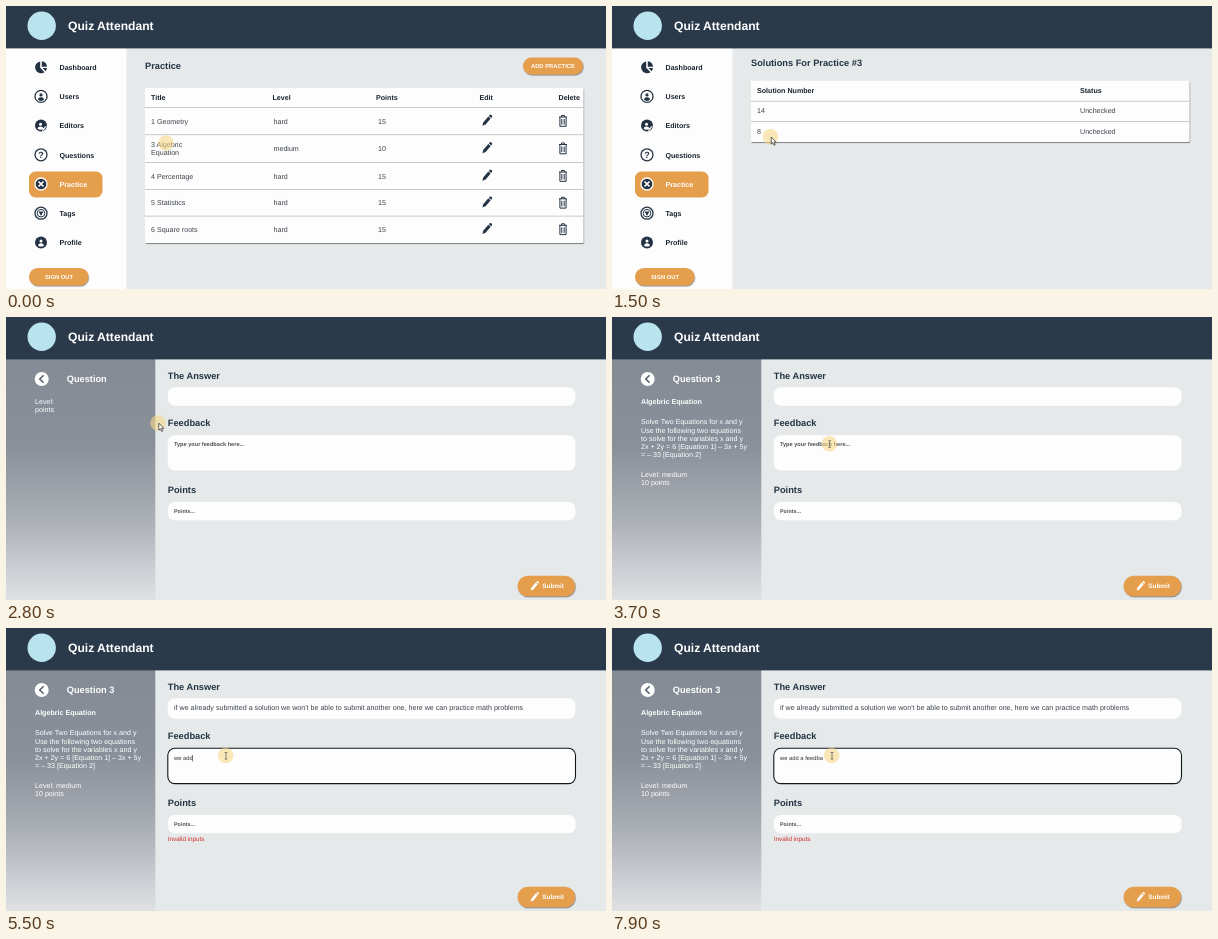
Write an HTML page that moves like this. It is 600 px wide and 283 px high and loops after 8 s.

```html
<!DOCTYPE html>
<html lang="en">
<head>
<meta charset="utf-8">
<title>Practice review</title>
<style>
  html, body { margin: 0; height: 100%; overflow: hidden; background: #e5e9e9; }
  svg { display: block; width: 600px; height: 283px; }
  text { font-family: "Liberation Sans", Arial, sans-serif; white-space: pre; text-rendering: geometricPrecision; }
</style>
</head>
<body>
<svg id="stage" viewBox="0 0 600 283">
  <defs>
    <linearGradient id="panel" x1="0" y1="0" x2="0" y2="1">
      <stop offset="0" stop-color="#848b95"/>
      <stop offset=".36" stop-color="#8a9099"/>
      <stop offset=".65" stop-color="#a9adb4"/>
      <stop offset="1" stop-color="#dfe1e4"/>
    </linearGradient>
    <filter id="shadow" x="-10%" y="-20%" width="120%" height="150%">
      <feDropShadow dx=".6" dy="1.1" stdDeviation=".7" flood-color="#4a4a4a" flood-opacity=".6"/>
    </filter>
    <g id="person">
      <circle cy="-1.8" r="2"/>
      <path d="M-4 4Q-3.4 1.2 0 1.2T4 4Q2.3 5.6 0 5.6T-4 4Z"/>
    </g>
    <g id="pencil">
      <path d="M-4.3 5.2-3.5 2 1.6-4 4 -2 -1.1 4ZM2.2-4.6 3.2-5.7Q4-6.2 5-5.3T5.2-3.4L4.5-2.6Z"/>
    </g>
    <g id="bin" fill="none" stroke="#243343" stroke-width="1">
      <path d="M-4-4H4M-1.5-4V-5.5H1.5V-4M-3.1-4V5.3H3.1V-4M-1.2-2V3.6M1.2-2V3.6"/>
    </g>
  </defs>
  <g id="page"></g>
  <g id="pointer"></g>
</svg>
<script>
const INK = '#243343', NAVY = '#2b3a4b', ORANGE = '#e59e4c', LOOP = 8000;
const page = document.getElementById('page');
const pointer = document.getElementById('pointer');

const text = (x, y, str, { size = 7.12, fill = '#3c434a', bold = false } = {}) =>
  `<text x="${x}" y="${y}" font-size="${size}" fill="${fill}" font-weight="${bold ? 700 : 400}">${str}</text>`;
const title = (x, y, str, fill = INK) => text(x, y, str, { size: 9.25, fill, bold: true });
const label = (x, y, str, fill = '#18222d') => text(x, y, str, { fill, bold: true });
const rect = (x, y, w, h, fill, r = 0, extra = '') =>
  `<rect x="${x}" y="${y}" width="${w}" height="${h}" rx="${r}" fill="${fill}" ${extra}/>`;
const use = (id, x, y, fill = INK, scale = 1) =>
  `<use href="#${id}" transform="translate(${x} ${y}) scale(${scale})" fill="${fill}"/>`;
const disc = (fill, stroke = 'none') => `<circle r="6" fill="${fill}" stroke="${stroke}" stroke-width="1.3"/>`;
const button = (x, y, w, h) => rect(x, y, w, h, ORANGE, h / 2, 'filter="url(#shadow)"');

const header = rect(0, 0, 600, 42.4, NAVY)
  + '<circle cx="35.7" cy="19.8" r="14.2" fill="#b9e3ee"/>'
  + text(62, 24.4, 'Quiz Attendant', { size: 12.1, fill: '#fff', bold: true });

const ring = disc('none', INK), solid = disc(INK);
const menu = [
  ['Dashboard', `<path fill="${INK}" d="M-.8-5.8V.6L3.6 5A6 6 0 1 1-.8-5.8ZM.8-6A6 6 0 0 1 6-.5H.8ZM1.5.9H6A6 6 0 0 1 4.6 4.1Z"/>`],
  ['Users', ring + use('person', 0, 0, INK, .8)],
  ['Editors', solid + use('person', -.5, 0, '#fff', .75) + use('pencil', 3, 3, '#fff', .45)],
  ['Questions', ring + text(-2.7, 3.2, '?', { size: 9, fill: INK, bold: true })],
  ['Practice', disc(INK, '#fff') + '<path d="M-2.5-2.5 2.5 2.5M2.5-2.5-2.5 2.5" stroke="#fff" stroke-width="1.7"/>'],
  ['Tags', disc('#fff', INK) + `<circle r="3.8" fill="none" stroke="${INK}"/><path d="M-2.3-1.6H2.3L0 2.8Z" fill="${INK}"/>`],
  ['Profile', solid + use('person', 0, 0, '#fff', .75)]
];

const sidebar = rect(0, 42, 120.5, 241, '#fdfdfe')
  + rect(23, 165.5, 73.5, 26, ORANGE, 6.5)
  + menu.map(([name, icon], i) => {
      const y = 61.2 + i * 29.2;
      return `<g transform="translate(35 ${y})">${icon}</g>`
        + label(53.5, y + 2.7, name, name === 'Practice' ? '#fff' : '#18222d');
    }).join('')
  + button(23, 262, 59.5, 17.5)
  + text(39, 272.8, 'SIGN OUT', { size: 5.8, fill: '#fff', bold: true });

const table = (top, lines, bottom) =>
  rect(139, top, 438.3, bottom - top, '#fdfdfe', 1, 'filter="url(#shadow)"')
  + lines.map(y => rect(139, y, 438.3, .8, '#b9bdc1')).join('');

function practicePage() {
  const rows = [
    [115, ['1 Geometry'], 'hard', 15],
    [142.5, ['3 Algebric', 'Equation'], 'medium', 10],
    [170, ['4 Percentage'], 'hard', 15],
    [196.8, ['5 Statistics'], 'hard', 15],
    [223.3, ['6 Square roots'], 'hard', 15]
  ];
  const heads = [[145, 'Title'], [266.5, 'Level'], [370, 'Points'], [473.5, 'Edit'], [552.5, 'Delete']];
  return sidebar + title(139, 63.2, 'Practice')
    + button(517, 51.5, 60, 17)
    + text(525, 62.3, 'ADD PRACTICE', { size: 5.8, fill: '#fff', bold: true })
    + table(82, [101, 128.3, 156.2, 183, 209.7], 237)
    + heads.map(([x, str]) => label(x, 93.7, str)).join('')
    + rows.map(([y, names, level, points]) =>
        names.map((str, i) => text(145, y + 2.5 + (i - (names.length - 1) / 2) * 8, str)).join('')
        + text(267.5, y + 2.5, level) + text(372, y + 2.5, points)
        + use('pencil', 480.7, y - .5) + use('bin', 557, y)).join('');
}

function solutionsPage(loaded, hovered) {
  return sidebar + title(139, 59.7, 'Solutions For Practice #3')
    + table(74.8, loaded ? [94.8, 115.2] : [], loaded ? 136 : 95)
    + label(145, 86.6, 'Solution Number') + label(468, 86.6, 'Status')
    + (loaded ? ['14', '8'].map((id, i) =>
        text(145, 107.4 + i * 20.6, id, { fill: hovered && !i ? '#c9862f' : '#3c434a' })
        + text(468, 107.4 + i * 20.6, 'Unchecked')).join('') : '');
}

const FEEDBACK = 'we add a feedba';
// [time, typed characters, caret visible]
const typing = [
  [3900, 0, 0], [4300, 0, 1], [4500, 1, 1], [4700, 2, 1], [4900, 3, 1], [5100, 4, 1], [5300, 5, 1],
  [5500, 6, 1], [5600, 7, 1], [5800, 8, 1], [6000, 9, 0], [6500, 10, 1], [6600, 11, 1], [6800, 12, 1],
  [7000, 12, 0], [7200, 13, 1], [7300, 13, 0], [7500, 14, 1], [7800, 15, 1], [7900, 15, 0]
];
const details = [
  'Solve Two Equations for x and y', 'Use the following two equations',
  'to solve for the variables x and y', '2x + 2y = 6 [Equation 1] – 3x + 5y', '= – 33 [Equation 2]'
];

function questionPage(t) {
  const loaded = t >= 3100, answered = t >= 4800;
  const state = typing.filter(([time]) => time <= t).pop();
  const focused = Boolean(state);
  const typed = focused ? FEEDBACK.slice(0, state[1]) : '';
  const white = { fill: '#fff' }, hint = { size: 5.6, fill: '#4b4f54', bold: true };
  const caret = focused && state[2] ? '<tspan font-size="7" dx="-.9">|</tspan>' : '';

  const side = rect(0, 42, 149.3, 241, 'url(#panel)')
    + '<circle cx="35.7" cy="62" r="7" fill="#fff"/><path d="M37.6 58.3 33.8 62 37.6 65.7" fill="none" stroke="#59616c" stroke-width="1.6"/>'
    + title(60.7, 65.3, loaded ? 'Question 3' : 'Question', '#fff')
    + (loaded
      ? label(29, 87.1, 'Algebric Equation', '#fff')
        + details.map((str, i) => text(29, 107.4 + i * 8.1, str, white)).join('')
        + text(29, 159.8, 'Level: medium', white) + text(29, 167.9, '10 points', white)
      : text(29, 87.1, 'Level:', white) + text(29, 95.2, 'points', white));

  const fields = title(161.8, 109, 'Feedback')
    + rect(161.8, 118.3, 407.7, 35.3, '#fdfdfe', 7, focused ? 'stroke="#10161c" stroke-width="1.1"' : '')
    + (focused
      ? text(168, 129.6, typed + caret, { size: 5.8, fill: '#333' })
      : text(168, 129.2, 'Type your feedback here...', hint))
    + title(161.8, 176.4, 'Points') + rect(161.8, 185, 407.7, 18.3, '#fdfdfe', 7)
    + text(168, 196, 'Points...', { ...hint, size: 5.4 })
    + (focused ? text(161.8, 211, 'Invalid inputs', { size: 6.25, fill: '#d42a2a' }) : '');

  return side + title(161.8, 62, 'The Answer')
    + rect(161.8, 70.3, 407.7, answered ? 20.4 : 18.4, '#fdfdfe', 7)
    + (answered ? text(168, 82.4, "if we already submitted a solution we won't be able to submit another one, here we can practice math problems") : '')
    + `<g transform="translate(0 ${answered ? 2 : 0})">${fields}</g>`
    + button(511.5, 258.8, 57.7, 20.5) + use('pencil', 528.3, 269, '#fff', .85)
    + text(536.3, 271.3, 'Submit', { size: 6.4, fill: '#fff', bold: true });
}

const cursors = {
  none: '',
  arrow: '<path d="M.8.2V7.2L2.4 5.8 3.6 8.4 4.8 7.8 3.6 5.3H5.8Z" fill="#fff" stroke="#222" stroke-width=".7"/>',
  hand: '<path d="M.9 2Q1.8 1.2 2.5 2.2V5L6.2 5.8Q7 6.2 6.7 8L5.8 11H2.3L-.5 7.8Q-.4 6.7.9 7.3Z" fill="#fff" stroke="#222" stroke-width=".8"/>',
  beam: '<path d="M-1-3H1.6M.3-3V3.6M-1 3.6H1.6" fill="none" stroke="#555" stroke-width=".7"/>'
};

function glide(t, start, end, from, to) {
  const p = Math.min(1, Math.max(0, (t - start) / (end - start)));
  const ease = p * p * (3 - 2 * p);
  return from.map((v, i) => v + (to[i] - v) * ease);
}

function drawPointer(t) {
  const [x, y] = t < 2900
    ? glide(t, 1300, 2000, [160, 137], [152, 106])
    : glide(t, 2900, 3800, [152, 106], [219.7, 127.5]);
  const kind = t < 500 ? 'none' : t < 1900 ? 'arrow' : t < 2500 ? 'hand' : t < 3700 ? 'arrow' : 'beam';
  pointer.setAttribute('transform', `translate(${x} ${y})`);
  pointer.innerHTML = `<circle r="7.8" fill="#f6d987" opacity=".6"/>${cursors[kind]}`;
}

let lastStep = -1;
function frame(now) {
  const t = Math.floor(now % LOOP / 100) * 100;
  if (t !== lastStep) {
    lastStep = t;
    const body = t < 500 ? practicePage()
      : t < 2500 ? solutionsPage(t >= 1000, t >= 1900)
      : questionPage(t);
    page.innerHTML = body + header;
    drawPointer(t);
  }
  requestAnimationFrame(frame);
}
frame(0);
</script>
</body>
</html>
```
